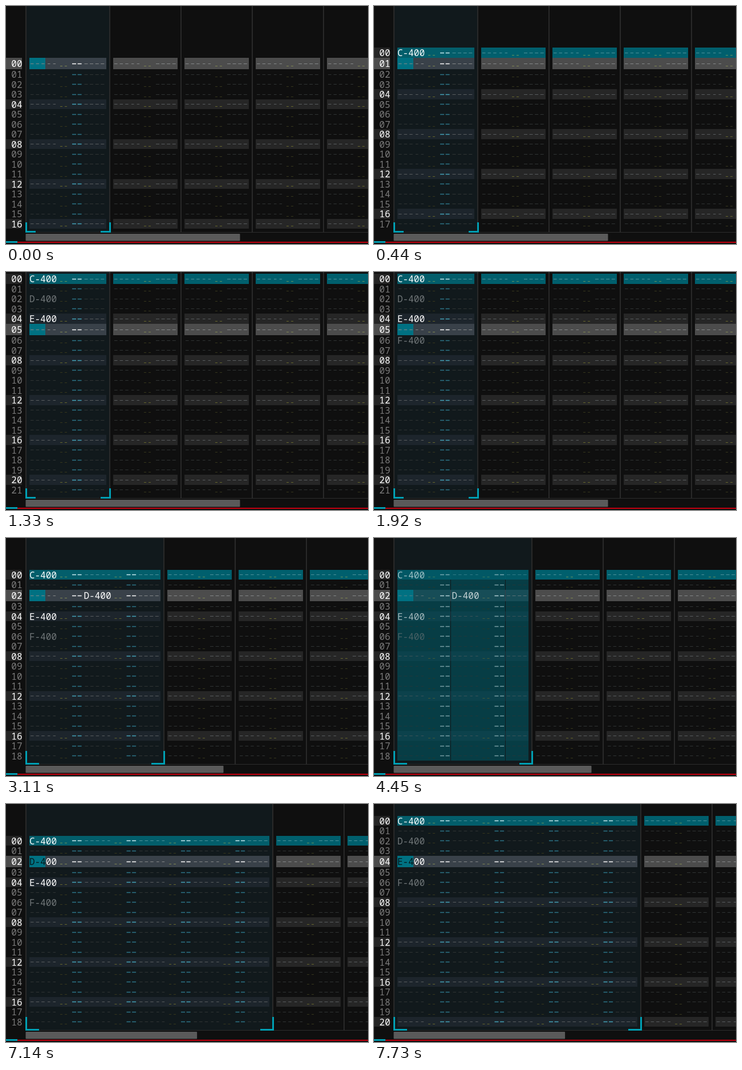
Recreate the animation shown at these times as an HTML page. Size 635 by 418 pixels, loop 8 s.

```html
<!DOCTYPE html>
<html lang="en">
<head>
<meta charset="utf-8">
<title>Pattern editor</title>
<style>
  html, body { margin: 0; width: 100%; height: 100%; overflow: hidden; background: #0f0f0f; }
  svg { display: block; width: 635px; height: 418px; }
  text { font: 16px "Noto Sans Mono", "DejaVu Sans Mono", monospace; white-space: pre; }
</style>
</head>
<body>
<svg id="stage" viewBox="0 0 635 418"></svg>
<script>
const LOOP = 8000, LEFT = 41, COL = 95.5, CHAR = 9.6, ROW = 17.5, CURSOR_Y = 101;
const NOTES = [[0, "C-400"], [2, "D-400"], [4, "E-400"], [6, "F-400"]];

// Each step lists only what changes at that time.
const STEPS = [
  [0, { cur: 0, notes: 0, cols: 1, shift: 0, dCol: 0, selEnd: 0 }],
  [440, { cur: 1, notes: 1 }],
  [590, { cur: 2 }],
  [890, { cur: 3 }],
  [1030, { cur: 4, notes: 2 }],
  [1330, { cur: 5, notes: 3 }],
  [1620, { cur: 6 }],
  [1770, { cur: 7, notes: 4 }],
  [1920, { cur: 5 }],
  [2060, { cur: 2 }],
  [3110, { cols: 2, dCol: 1 }],
  [4450, { selEnd: 271 }],
  [4900, { cols: 3, shift: 1, selEnd: 304 }],
  [5190, { cols: 4, shift: 2 }],
  [5490, { shift: 1 }],
  [5790, { shift: 0 }],
  [6540, { selEnd: 0 }],
  [7140, { dCol: 0 }],
  [7580, { cur: 3 }],
  [7730, { cur: 4 }]
];

// Colours per row kind: [active fill, other fill, dash, volume, delay, note]
const LOOK = {
  plain: ["", "", "#303434", "#36361c", "#2d7486", "#707678"],
  beat: ["#1d252c", "#262626", "#595d5f", "#66662c", "#45a3b9", "#ffffff"],
  first: ["#035e6b", "#005f6d", "#4f929b", "#62935f", "#c9eaf0", "#ffffff"],
  cursor: ["#394149", "#4c4c4c", "#858889", "#7f8653", "#ffffff", "#ffffff"]
};

const stage = document.getElementById("stage");

const rect = (x, y, w, h, fill) =>
  `<rect x="${x}" y="${y}" width="${w}" height="${h}" fill="${fill}" shape-rendering="crispEdges"/>`;
const label = (x, y, str, fill, opacity = 1) =>
  `<text x="${x}" y="${y}" fill="${fill}" opacity="${opacity}">${str}</text>`;
const stroke = (d, color, width, opacity = 1) =>
  d && `<path d="${d}" stroke="${color}" stroke-width="${width}" opacity="${opacity}" fill="none"/>`;

function dashes(x, y, count, len, pitch = CHAR) {
  let d = "";
  for (let i = 0; i < count; i++) d += `M${(x + i * pitch).toFixed(1)} ${y}h${len}`;
  return d;
}

function rowY(offset) {
  if (!offset) return CURSOR_Y;
  return offset > 0 ? 120 + ROW * (offset - 1) : 82 + ROW * (offset + 1);
}

function rowKind(row, cur) {
  if (row === cur) return "cursor";
  return row === 0 ? "first" : row % 4 ? "plain" : "beat";
}

function noteAt(s, row, col) {
  const i = NOTES.findIndex(n => n[0] === row);
  if (i < 0 || i >= s.notes) return "";
  const home = i === 1 ? s.dCol : 0;
  return home + s.shift === col ? NOTES[i][1] : "";
}

function selection(s, y, h) {
  let out = "";
  [[41, 134], [135, 230], [231, s.selEnd]].forEach(([a, b]) => {
    out += rect(a, y, b - a, h, "rgba(0,86,98,.6)");
  });
  return out;
}

// Note, instrument and volume placeholders, then the effect column.
function emptyCell(x, y, look, hasNote, opacity) {
  const d = hasNote ? "" : dashes(x + 2, y, 3, 5.5) + dashes(x + 32, y, 2, 4.5);
  return stroke(d, look[2], 1, opacity) +
    stroke(dashes(x + 54, y + 4, 2, 4, 8), look[3], 1, opacity);
}

const effectCell = (x, y, look, opacity) => stroke(dashes(x + 1, y, 4, 6), look[2], 1, opacity);

function drawActiveRow(s, row, c, top, h, look, right) {
  const isCur = row === s.cur, y = Math.floor(c) + .5;
  let out = look[0] ? rect(LEFT, top, right - LEFT, h, look[0]) : "";
  if (s.selEnd) out += selection(s, top, h);
  if (isCur) out += rect(LEFT, top, 28, h, "#007182");

  for (let col = 0; col < s.cols; col++) {
    const x = LEFT + col * COL, note = noteAt(s, row, col);
    const dim = x < s.selEnd ? .62 : 1;
    const delayDim = x + 74 < s.selEnd;
    out += emptyCell(x, y, look, note, dim);
    out += stroke(dashes(x + 75, y, 2, 7),
      delayDim ? "#c4dde1" : look[4], 1.5, delayDim ? (isCur ? .9 : .6) : 1);
    if (!note) continue;
    if (isCur && col === 0) {
      out += label(x, c + 6, note.slice(0, 3), "#06181b");
      out += label(x + 3 * CHAR, c + 6, note.slice(3), look[5]);
    } else {
      out += label(x, c + 6, note, look[5], isCur && dim < 1 ? .75 : dim);
    }
  }
  const fx = LEFT + s.cols * COL;
  return out + effectCell(fx, y, look, fx < s.selEnd ? .62 : 1);
}

function drawRow(s, row, edge, right) {
  const kind = rowKind(row, s.cur), look = LOOK[kind];
  const isCur = kind === "cursor", c = rowY(row - s.cur), y = Math.floor(c) + .5;
  const top = isCur ? 91 : c - ROW / 2, h = isCur ? 20 : ROW;
  const strong = row % 4 === 0 || isCur;
  let out = "";
  if (strong) out += rect(0, top, 28, h, isCur ? "#4c4c4c" : "#252525");
  out += label(9.3, c + 6, String(row).padStart(2, "0"), strong ? "#fff" : "#7c7c7c");
  out += drawActiveRow(s, row, c, top, h, look, right);
  for (let x = edge + 6; x < 635; x += 125) {
    if (look[1]) out += rect(x, top, 112.5, h, look[1]);
    out += emptyCell(x, y, look, false, 1) + effectCell(x + 74, y, look, 1);
  }
  return out;
}

function drawFrame(s, edge) {
  const end = edge + 1, top = s.cols > 1 ? 374 : 380, arm = s.cols > 1 ? 24 : 18;
  const thumb = 429750 / (1047.5 + COL * s.cols), cyan = "#00a0b4";
  return rect(34, 397, 601, 1, "#2d2d2d") +
    rect(34, top, 3, 398 - top, cyan) + rect(34, 395, arm, 3, cyan) +
    rect(end - 2, top, 3, 398 - top, cyan) + rect(end + 1 - arm, 395, arm, 3, cyan) +
    `<rect x="34.5" y="400" width="${thumb}" height="12.5" rx="1" fill="#5a5a5a"/>` +
    rect(20, 414, 615, 2, "#c4000f") + rect(0, 413, 20, 3, cyan);
}

function draw(s) {
  const right = Math.round(80 + COL * s.cols);
  const edge = Math.round(86.3 + COL * s.cols);
  let out = rect(0, 0, 635, 418, "#0f0f0f") + rect(36, 0, edge - 36, 397, "#11191c");
  out += rect(34, 0, 2, 397, "#292929");
  for (let x = edge; x < 635; x += 125) out += rect(x - 1, 0, 2, 397, "#292929");
  for (let row = Math.max(0, s.cur - 6); row <= s.cur + 16; row++) {
    out += drawRow(s, row, edge, right);
  }
  stage.innerHTML = out + drawFrame(s, edge);
}

let shown = -1;
const start = performance.now();

function tick(now) {
  const t = Math.max(0, now - start) % LOOP;
  const count = STEPS.filter(step => step[0] <= t).length;
  if (count !== shown) {
    shown = count;
    draw(Object.assign({}, ...STEPS.slice(0, count).map(step => step[1])));
  }
  requestAnimationFrame(tick);
}
tick(start);
</script>
</body>
</html>
```
